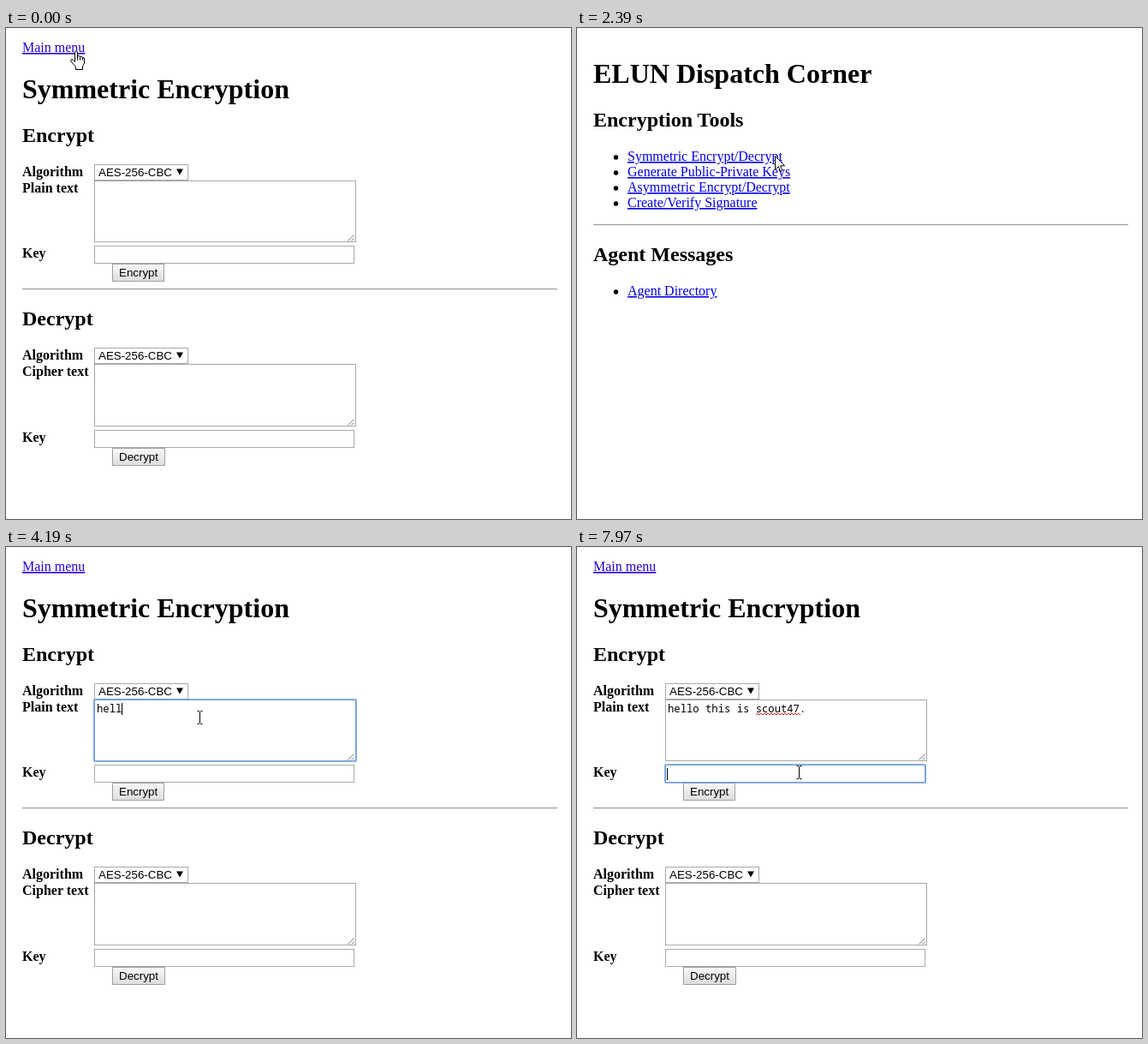
An HTML page that plays this animation: 660 by 573 pixels, repeating every 8000 ms.

```html
<!DOCTYPE html>
<html lang="en">
<head>
<meta charset="utf-8">
<title>Symmetric Encryption</title>
<style>
html, body { margin: 0; width: 100%; height: 100%; overflow: hidden; background: #fff; }
svg { display: block; width: 660px; height: 573px; }
text { font: 16px "Liberation Serif", serif; fill: #000; white-space: pre; }
.h1 { font-size: 32px; font-weight: bold; }
.h2 { font-size: 24px; font-weight: bold; }
.label { font-weight: bold; }
.ui { font: 13.333px "Liberation Sans", sans-serif; }
.mono { font: 12.22px "Noto Sans Mono", monospace; }
.link { fill: #0000ee; text-decoration: underline; }
.seen { fill: #2200dd; }
.box { fill: #fff; stroke: #a9a9a9; }
.ring { fill: none; stroke: #6a9ce8; stroke-width: 1.7; }
.pointer { fill: #fff; stroke: #000; stroke-linejoin: round; }
</style>
</head>
<body>
<svg id="stage" viewBox="0 0 660 573">
  <defs>
    <linearGradient id="face" x2="0" y2="1">
      <stop stop-color="#f8f8f8"/><stop offset="1" stop-color="#dddddd"/>
    </linearGradient>
  </defs>
  <g id="menu"></g>
  <g id="form"></g>
  <g id="live">
    <text id="typed" class="mono" x="106" y="193"></text>
    <path id="squiggle" fill="none" stroke="#e02020"/>
    <rect id="areaRing" class="ring" x="103" y="178" width="306" height="72" rx="1"/>
    <rect id="keyRing" class="ring" x="103" y="254" width="304" height="21" rx="1"/>
    <rect id="caret" width="1" height="14"/>
  </g>
  <path id="arrow" class="pointer" d="M.5 .5V16.3L4.3 12.7L6.8 18.4L9 17.5L6.6 11.8H11.6Z"/>
  <g id="hand" class="pointer">
    <path d="M-.5 13.5V2Q1 -.8 2.5 2V7Q4.3 5.6 5.5 7.4Q7.3 6.4 8.5 8.3Q10.5 7.6 10.5 10V15L8.5 18.8V22.5H.5V19.3L-5 13Q-6.2 9.8 -3 10.8Z"/>
    <path d="M2.5 7V11.5M5.5 7.5V11.5M8.5 8.5V11.5" fill="none"/>
  </g>
  <path id="beam" fill="none" stroke="#000" d="M-3 -7.5H-1L0 -6.5L1 -7.5H3M0 -6.5V6.5M-3 7.5H-1L0 6.5L1 7.5H3"/>
</svg>
<script>
const LOOP = 8000;
const MESSAGE = "hello this is scout47.";
const CHAR = 7.33;
const $ = id => document.getElementById(id);

function add(parent, tag, attrs, text = "") {
  const el = document.createElementNS("http://www.w3.org/2000/svg", tag);
  for (const name in attrs) el.setAttribute(name, attrs[name]);
  el.textContent = text;
  parent.append(el);
}

const label = (g, cls, x, y, text) => add(g, "text", { class: cls, x, y }, text);
const box = (g, x, y, width, height, more) =>
  add(g, "rect", { class: "box", x: x + .5, y: y + .5, width: width - 1, height: height - 1, ...more });

function rule(g, y) {
  add(g, "rect", { x: 19, y, width: 625, height: 1, fill: "#9a9a9a" });
  add(g, "rect", { x: 19, y: y + 1, width: 625, height: 1, fill: "#eeeeee" });
}

function section(g, title, field, top, slack) {
  const low = top + slack;
  label(g, "h2", 19, top + 133, title);
  label(g, "label", 19, top + 173, "Algorithm");
  box(g, 103, top + 159, 110, 19);
  label(g, "ui", 108, top + 173, "AES-256-CBC");
  add(g, "path", { d: `M199 ${top + 164.5}h8l-4 7z` });
  label(g, "label", 19, top + 192, field);
  box(g, 103, top + 178, 306, 72 + slack);
  add(g, "path", { d: `M399.5 ${low + 248.5}l7 -7m-3 7l3 -3`, stroke: "#808080", fill: "none" });
  label(g, "label", 19, low + 268, "Key");
  box(g, 103, low + 254, 304, 21);
  box(g, 124, low + 275, title === "Encrypt" ? 61 : 62, 21, { style: "fill:url(#face);stroke:#a0a0a0" });
  label(g, "ui", 132, low + 290, title);
}

function buildForm(g) {
  label(g, "link seen", 19, 28, "Main menu");
  label(g, "h1", 19, 82, "Symmetric Encryption");
  section(g, "Encrypt", "Plain text", 0, 0);
  rule(g, 304);
  section(g, "Decrypt", "Cipher text", 214, 1);
}

function buildMenu(g) {
  const item = (y, text) => {
    add(g, "circle", { cx: 45.5, cy: y - 4, r: 2.7 });
    label(g, "link", 59, y, text);
  };
  label(g, "h1", 19, 64, "ELUN Dispatch Corner");
  label(g, "h2", 19, 115, "Encryption Tools");
  ["Symmetric Encrypt/Decrypt", "Generate Public-Private Keys",
   "Asymmetric Encrypt/Decrypt", "Create/Verify Signature"]
    .forEach((text, i) => item(155 + 18 * i, text));
  rule(g, 229);
  label(g, "h2", 19, 272, "Agent Messages");
  item(312, "Agent Directory");
}

// [time, pointer, x, y]
const POINTER = [
  [0, "hand", 81, 26], [150, "hand", 79, 25], [270, "hand", 77, 23],
  [860, "arrow", 77, 23], [1140, "arrow", 82, 25], [1290, "arrow", 170, 84],
  [1410, "arrow", 267, 147], [1690, "arrow", 240, 147],
  [1840, "hand", 235, 148], [1960, "hand", 231, 149],
  [2390, "arrow", 231, 149], [2890, "arrow", 231, 158],
  [3040, "beam", 226.5, 197], [3190, "beam", 226.5, 199],
  [7310, "beam", 222.5, 215], [7430, "beam", 213.5, 245],
  [7580, "beam", 209.5, 260], [7730, "beam", 238.5, 262], [7850, "beam", 259.5, 263]
];

// [time, characters typed]
const TYPING = [
  [0, 0], [3780, 1], [3930, 2], [4070, 3], [4190, 4], [4310, 5],
  [4580, 7], [4710, 8], [4830, 10], [4970, 11], [5090, 12], [5210, 14],
  [5770, 15], [5920, 16], [6050, 17], [6190, 18], [6320, 20], [6470, 21], [6600, 22]
];

const at = (steps, t) => steps.findLast(step => step[0] <= t);
const show = (id, on) => $(id).setAttribute("display", on ? "inline" : "none");

function draw(t) {
  const onMenu = t >= 860 && t < 2510;
  const count = at(TYPING, t)[1];
  const inKey = t >= 7970;
  const inArea = t >= 3340 && !inKey;

  show("menu", onMenu);
  show("form", !onMenu);
  show("live", !onMenu);
  show("areaRing", inArea);
  show("keyRing", inKey);
  show("squiggle", t >= 6600);
  show("caret", inKey || inArea && (t < 7160 || t >= 7730));
  $("typed").textContent = MESSAGE.slice(0, count);
  $("caret").setAttribute("x", inKey ? 105 : Math.floor(106 + count * CHAR));
  $("caret").setAttribute("y", inKey ? 258 : 182);

  const [, kind, x, y] = at(POINTER, t);
  for (const id of ["arrow", "hand", "beam"]) show(id, id === kind);
  $(kind).setAttribute("transform", `translate(${x} ${y})`);
}

buildMenu($("menu"));
buildForm($("form"));
$("squiggle").setAttribute("d", "M209 196" + "l2 -2l2 2".repeat(13));

const start = performance.now();
function tick() {
  draw((performance.now() - start) % LOOP);
  requestAnimationFrame(tick);
}
draw(0);
requestAnimationFrame(tick);
</script>
</body>
</html>
```
